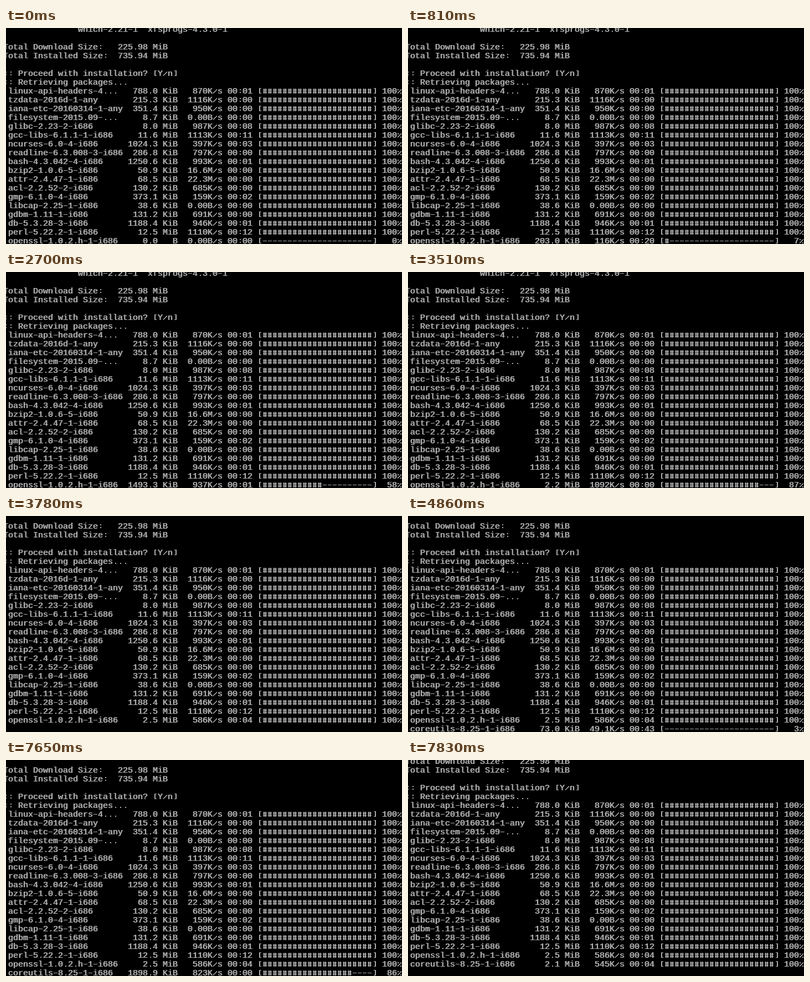
Animation of 715 by 392 pixels, one loop 8000 ms. Source, as an HTML page with a canvas:

```html
<!DOCTYPE html>
<html lang="en">
<head>
<meta charset="utf-8">
<title>Package download</title>
<style>
html, body { margin: 0; width: 100%; height: 100%; overflow: hidden; background: #000; }
canvas { display: block; }
</style>
</head>
<body>
<canvas id="screen" width="715" height="392"></canvas>
<script>
const ctx = document.getElementById('screen').getContext('2d');
const LOOP = 8000, CELL_W = 9, CELL_H = 16, LEFT = -4, TOP = -5;
const BAR = 22, SLOW_STEP = 360, FAST_STEPS = 6;

const HEADER = [
  ' '.repeat(15) + 'which-2.21-1  xfsprogs-4.3.0-1',
  '',
  'Total Download Size:   225.98 MiB',
  'Total Installed Size:  735.94 MiB',
  '',
  ':: Proceed with installation? [Y/n]',
  ':: Retrieving packages...'
];

const DONE = `
linux-api-headers-4... 788.0 KiB 870K/s 00:01
tzdata-2016d-1-any 215.3 KiB 1116K/s 00:00
iana-etc-20160314-1-any 351.4 KiB 950K/s 00:00
filesystem-2015.09-... 8.7 KiB 0.00B/s 00:00
glibc-2.23-2-i686 8.0 MiB 987K/s 00:08
gcc-libs-6.1.1-1-i686 11.6 MiB 1113K/s 00:11
ncurses-6.0-4-i686 1024.3 KiB 397K/s 00:03
readline-6.3.008-3-i686 286.8 KiB 797K/s 00:00
bash-4.3.042-4-i686 1250.6 KiB 993K/s 00:01
bzip2-1.0.6-5-i686 50.9 KiB 16.6M/s 00:00
attr-2.4.47-1-i686 68.5 KiB 22.3M/s 00:00
acl-2.2.52-2-i686 130.2 KiB 685K/s 00:00
gmp-6.1.0-4-i686 373.1 KiB 159K/s 00:02
libcap-2.25-1-i686 38.6 KiB 0.00B/s 00:00
gdbm-1.11-1-i686 131.2 KiB 691K/s 00:00
db-5.3.28-3-i686 1188.4 KiB 946K/s 00:01
perl-5.22.2-1-i686 12.5 MiB 1110K/s 00:12`.trim().split('\n').map(finishedRow);

// Sizes in KiB, rates in K/s, times in ms
const DOWNLOADS = [
  {
    name: 'openssl-1.0.2.h-1-i686', total: 2574, final: '2.5 MiB 586K/s 00:04',
    shown: 0, end: 3780,
    first: { at: 90, kib: 104 },
    mid: { at: 1890, kib: 722.6, rate: 412 },
    last: { at: 3510, kib: 2264, rate: 1092 }
  },
  {
    name: 'coreutils-8.25-1-i686', total: 2190, final: '2.1 MiB 545K/s 00:04',
    shown: 3960, end: 7830,
    first: { at: 4500, kib: 46.8 },
    mid: { at: 6120, kib: 577.2, rate: 388 },
    last: { at: 7650, kib: 1898.9, rate: 823 }
  }
];

function row(name, size, unit, rate, time, percent) {
  const filled = Math.floor(BAR * percent / 100);
  const bar = '#'.repeat(filled).padEnd(BAR, '-');
  return (' ' + name).padEnd(25) + size.padStart(6) + unit.padStart(4) +
    rate.padStart(9) + ' ' + time + ' [' + bar + ']' + `${percent}%`.padStart(5);
}

function finishedRow(fields) {
  return row(...fields.split(' '), 100);
}

function humanSize(kib) {
  if (kib === 0) return ['0.0', 'B'];
  return kib < 2048 ? [kib.toFixed(1), 'KiB'] : [(kib / 1024).toFixed(1), 'MiB'];
}

function humanRate(rate) {
  return rate ? rate.toFixed(rate < 99.95 ? 1 : 0) + 'K/s' : '0.00B/s';
}

// Slow start that eases in, then even steps while the rate settles towards its limit
function progress({ first, mid, last }, t) {
  if (t < first.at) return { kib: 0, rate: 0 };
  if (t < mid.at) {
    const elapsed = Math.floor((t - first.at) / SLOW_STEP) * SLOW_STEP;
    const u = elapsed / (mid.at - first.at);
    const kib = first.kib + (mid.kib - first.kib) * u * u;
    return { kib, rate: mid.rate * kib / mid.kib };
  }
  const u = Math.min(1, (t - mid.at) / (last.at - mid.at));
  const step = Math.floor(u * FAST_STEPS + 1e-6);
  const decay = n => 1 - (2 / 3) ** n;
  return {
    kib: mid.kib + (last.kib - mid.kib) * step / FAST_STEPS,
    rate: mid.rate + (last.rate - mid.rate) * decay(step) / decay(FAST_STEPS)
  };
}

function downloadRow(item, t) {
  if (t < item.shown) return '';
  if (t >= item.end) return finishedRow(item.name + ' ' + item.final);
  const { kib, rate } = progress(item, t);
  const seconds = rate ? Math.floor((item.total - kib) / rate) : 0;
  const time = '00:' + String(seconds).padStart(2, '0');
  const percent = Math.floor(kib / item.total * 100);
  return row(item.name, ...humanSize(kib), humanRate(rate), time, percent);
}

// Terminal marks as bars inside a cell: x, y, width, height
const dot = (x, y) => [x, y, 2, 2];
const bracket = stem => [[stem, 2, 2, 10], [2, 2, 4, 1], [2, 11, 4, 1]];
const slash = [[6, 4, 1, 1], [0, 11, 1, 1]];
for (let i = 0; i < 6; i++) slash.push([5 - i, 5 + i, 2, 1]);

const MARKS = {
  '#': [[1, 3, 2, 9], [4, 3, 2, 9], [0, 5, 7, 1], [0, 9, 7, 1]],
  '-': [[0, 7, 7, 1]],
  '[': bracket(2),
  ']': bracket(4),
  '.': [dot(3, 10)],
  ':': [dot(3, 4), dot(3, 9)],
  '/': slash,
  '%': [...slash, dot(0, 4), dot(5, 10)]
};

// Two passes one pixel apart give thick stems and thin bars
function drawLetter(char, x, baseline) {
  ctx.fillText(char, x - 1.5, baseline);
  ctx.fillText(char, x - 0.5, baseline);
}

function drawLine(text, y) {
  [...text].forEach((char, col) => {
    const x = LEFT + col * CELL_W;
    if (MARKS[char]) MARKS[char].forEach(([dx, dy, w, h]) => ctx.fillRect(x + dx, y + dy, w, h));
    else if (char !== ' ') drawLetter(char, x, y + 12);
  });
}

function draw(t) {
  ctx.fillStyle = '#000';
  ctx.fillRect(0, 0, 715, 392);
  ctx.fillStyle = '#aaa';
  ctx.font = '15px "Liberation Mono", monospace';
  const scroll = DOWNLOADS.filter(d => t >= d.end).length;
  const lines = [...HEADER, ...DONE, ...DOWNLOADS.map(d => downloadRow(d, t))];
  lines.forEach((line, i) => drawLine(line, TOP + (i - scroll) * CELL_H));
}

const start = performance.now();
function tick() {
  draw((performance.now() - start) % LOOP);
  requestAnimationFrame(tick);
}
tick();
</script>
</body>
</html>
```
